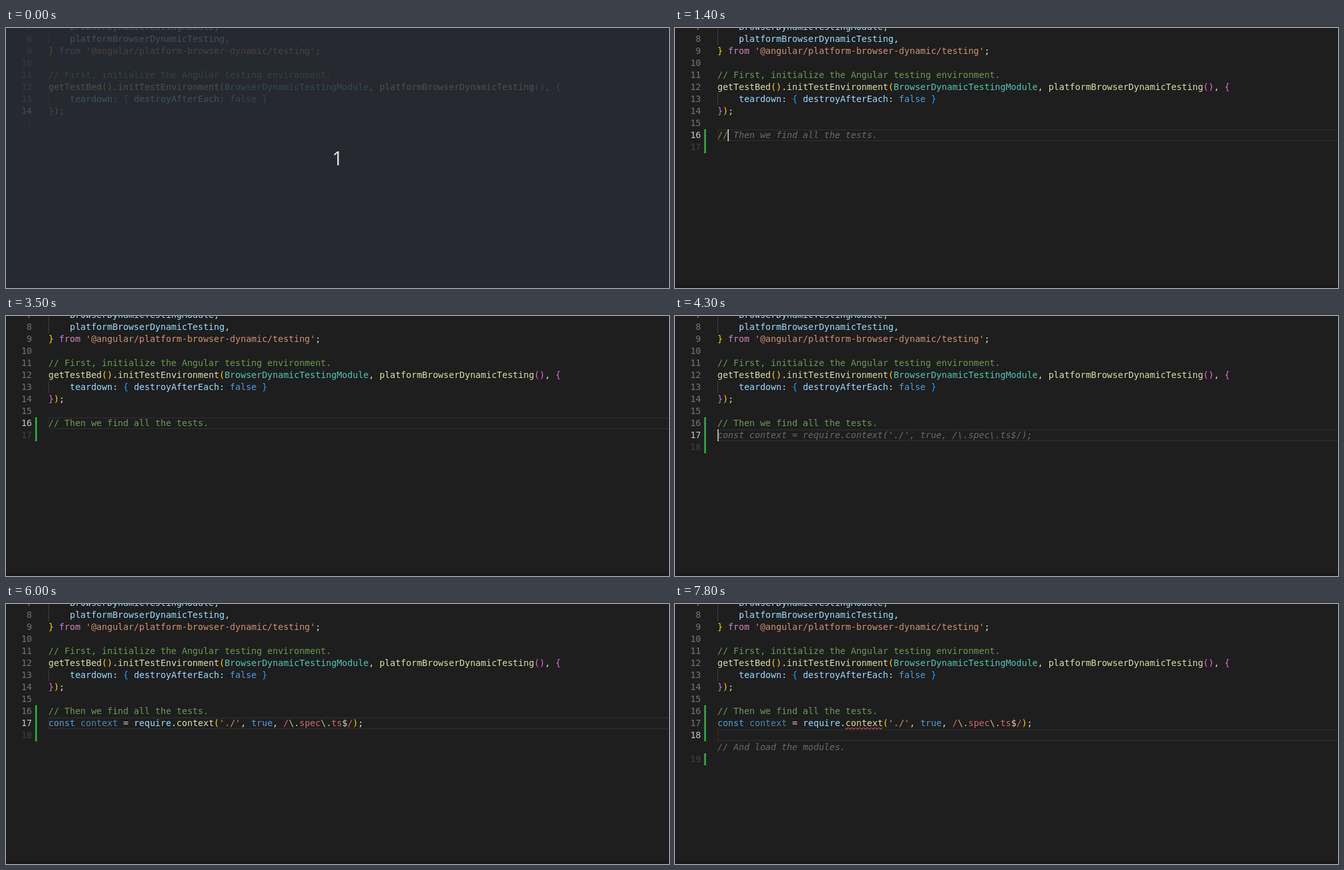
Animation of 1047 by 411 pixels, one loop 8 s. Source, as an HTML page:

```html
<!DOCTYPE html>
<html lang="en">
<head>
<meta charset="utf-8">
<title>Editor typing</title>
<style>
  html, body { margin: 0; width: 100%; height: 100%; overflow: hidden; background: #1e1e1e; }
  #stage { position: relative; width: 1047px; height: 411px; overflow: hidden; background: #1e1e1e;
    font: 14px/19px "DejaVu Sans Mono", monospace; color: #d4d4d4; }
  #stage div, #stage svg { position: absolute; }
  .line { left: 67px; height: 19px; white-space: pre; }
  .num { left: 0; width: 41px; height: 19px; text-align: right; color: #6e7681; }
  .num.active { color: #c6c6c6; }
  .num.last { opacity: .4; }
  .guide { left: 67px; width: 1px; background: #404040; }
  .bar { left: 46px; width: 3px; background: #2ea043; }
  .current { left: 67px; width: 990px; height: 19px; box-sizing: border-box; border: 2px solid #282828; }
  .caret { width: 2px; height: 19px; background: #aeafad; }
  .ghost { color: #6a6a6a; font-style: italic; }
  #edge { left: 0; top: 406px; width: 100%; height: 5px; background: #1c1619; }
  #veil { inset: 0; background: rgba(40, 44, 52, .8); }
  #count { left: 0; width: 100%; top: 186px; text-align: center; color: #dcdcdc;
    font: 30px/40px "Noto Sans", "Open Sans", sans-serif; }
</style>
</head>
<body>
<div id="stage">
  <div id="view"></div>
  <svg id="wave" width="59" height="3" style="left:269px;top:195px">
    <defs>
      <pattern id="zigzag" width="6" height="3" patternUnits="userSpaceOnUse">
        <path fill="#f14c4c" d="M5.5 0 2.5 3H1.1L4.1 0ZM4 0 6 2V.6L5.4 0ZM0 2 1 3H2.4L0 .6Z"/>
      </pattern>
    </defs>
    <rect width="59" height="3" fill="url(#zigzag)"/>
  </svg>
  <div id="edge"></div>
  <div id="veil"><div id="count">1</div></div>
</div>
<script>
const LOOP = 8000, LEFT = 67, ROW = 19, ADVANCE = 8.428;
const view = document.getElementById('view');
const wave = document.getElementById('wave');
const veil = document.getElementById('veil');

const color = {
  plain: '#d4d4d4', name: '#9cdcfe', call: '#dcdcaa', type: '#4ec9b0', word: '#569cd6',
  flow: '#c586c0', string: '#ce9178', note: '#6a9955', regex: '#d16969', escape: '#d7ba7d',
  constant: '#4fc1ff', unused: '#3f8bb5', b1: '#ffd700', b2: '#da70d6', b3: '#179fff'
};

// Each line is a flat list: kind, text, kind, text ...
const fixed = {
  7: ['name', '    BrowserDynamicTestingModule', 'plain', ','],
  8: ['name', '    platformBrowserDynamicTesting', 'plain', ','],
  9: ['b1', '}', 'flow', ' from ', 'string', "'@angular/platform-browser-dynamic/testing'", 'plain', ';'],
  11: ['note', '// First, initialize the Angular testing environment.'],
  12: ['call', 'getTestBed', 'b1', '()', 'plain', '.', 'call', 'initTestEnvironment', 'b1', '(',
    'type', 'BrowserDynamicTestingModule', 'plain', ', ', 'call', 'platformBrowserDynamicTesting',
    'b2', '()', 'plain', ', ', 'b2', '{'],
  13: ['name', '    teardown:', 'b3', ' { ', 'name', 'destroyAfterEach: ', 'word', 'false', 'b3', ' }'],
  14: ['b2', '}', 'b1', ')', 'plain', ';']
};

const comment = '// Then we find all the tests.';
const call = String.raw`const context = require.context('./', true, /\.spec\.ts$/);`;
const rawCall = ['plain', call.slice(0, 31), 'b1', '(', 'plain', call.slice(32, 57), 'b1', ')', 'plain', ';'];
const richCall = context => [
  'word', 'const ', context, 'context', 'plain', ' = ', 'name', 'require', 'plain', '.',
  'call', 'context', 'b1', '(', 'string', "'./'", 'plain', ', ', 'word', 'true', 'plain', ', ',
  'regex', '/', 'escape', '\\.', 'regex', 'spec', 'escape', '\\.', 'regex', 'ts',
  'call', '$', 'regex', '/', 'b1', ')', 'plain', ';'
];
const note = text => ['note', text];

// Time in ms and what changes then; caret is a column, -1 when hidden.
const steps = [
  [0, { veil: true, active: 14, last: 15, caret: -1, barEnd: 15, note: [], code: [], ghost: null, wave: false }],
  [100, { veil: false, active: 15, last: 16, caret: 0 }],
  [400, { barEnd: 16 }],
  [700, { active: 16, last: 17 }],
  [800, { barEnd: 17 }],
  [1100, { caret: -1 }],
  [1300, { note: note('/'), caret: 1 }],
  [1400, { note: note('//'), caret: 2, ghost: [16, 2, comment.slice(2)] }],
  [1900, { caret: -1 }],
  [2300, { caret: 2 }],
  [2800, { caret: -1 }],
  [3000, { note: note(comment), caret: 30, ghost: null }],
  [3500, { caret: -1 }],
  [4000, { caret: 30 }],
  [4200, { active: 17, last: 18, barEnd: 18, caret: 0 }],
  [4300, { ghost: [17, 0, call] }],
  [4600, { caret: -1 }],
  [5100, { caret: 0 }],
  [5500, { code: rawCall, caret: 59, ghost: null }],
  [5700, { code: richCall('constant') }],
  [5900, { code: richCall('unused') }],
  [6000, { caret: -1 }],
  [6400, { active: 18, last: 19, barEnd: 19, caret: 0, wave: true }],
  [6900, { caret: -1 }],
  [7100, { ghost: [19, 0, '// And load the modules.'], gap: 1 }],
  [7300, { caret: 0 }],
  [7800, { caret: -1 }]
];

let state = { gap: 0 };
const states = steps.map(([, change]) => state = { ...state, ...change });

const rowTop = n => 141 + (n - 15) * ROW;

function add(kind, top, style = {}, text = '') {
  const el = document.createElement('div');
  el.className = kind;
  el.textContent = text;
  Object.assign(el.style, { top: top + 'px' }, style);
  view.append(el);
  return el;
}

function addLine(n, parts) {
  const line = add('line', rowTop(n));
  for (let i = 0; i < parts.length; i += 2) {
    const span = document.createElement('span');
    span.style.color = color[parts[i]];
    span.textContent = parts[i + 1];
    line.append(span);
  }
}

function addSpan(kind, first, end) {
  if (end > first) add(kind, rowTop(first), { height: (end - first) * ROW + 'px' });
}

function draw(s) {
  view.replaceChildren();
  if (!s.veil) add('current', rowTop(s.active));
  addSpan('guide', 7, 9);
  addSpan('guide', 13, 14);

  for (let n = 7; n <= s.last; n++) {
    const kind = n === s.active ? ' active' : n === s.last ? ' last' : '';
    add('num' + kind, rowTop(n + (n === s.last ? s.gap : 0)), {}, n);
  }
  if (s.gap) {
    addSpan('bar', 16, s.barEnd);
    addSpan('bar', s.barEnd + s.gap, s.barEnd + s.gap + 1);
  } else {
    addSpan('bar', 16, s.barEnd + 1);
  }

  for (const n in fixed) addLine(+n, fixed[n]);
  addLine(16, s.note);
  addLine(17, s.code);
  if (s.ghost) {
    const [n, column, text] = s.ghost;
    add('line ghost', rowTop(n), { left: LEFT + column * ADVANCE + 'px' }, text);
  }
  if (s.caret >= 0) {
    const x = Math.round(LEFT + s.caret * ADVANCE) - (s.caret ? 1 : 0);
    add('caret', rowTop(s.active), { left: x + 'px' });
  }
  wave.style.display = s.wave ? '' : 'none';
  veil.style.display = s.veil ? '' : 'none';
}

let shown = -1;
const start = performance.now();

function tick() {
  const time = Math.max(0, performance.now() - start) % LOOP;
  const index = steps.findLastIndex(([at]) => at <= time);
  if (index !== shown) draw(states[shown = index]);
  requestAnimationFrame(tick);
}
tick();
</script>
</body>
</html>
```
